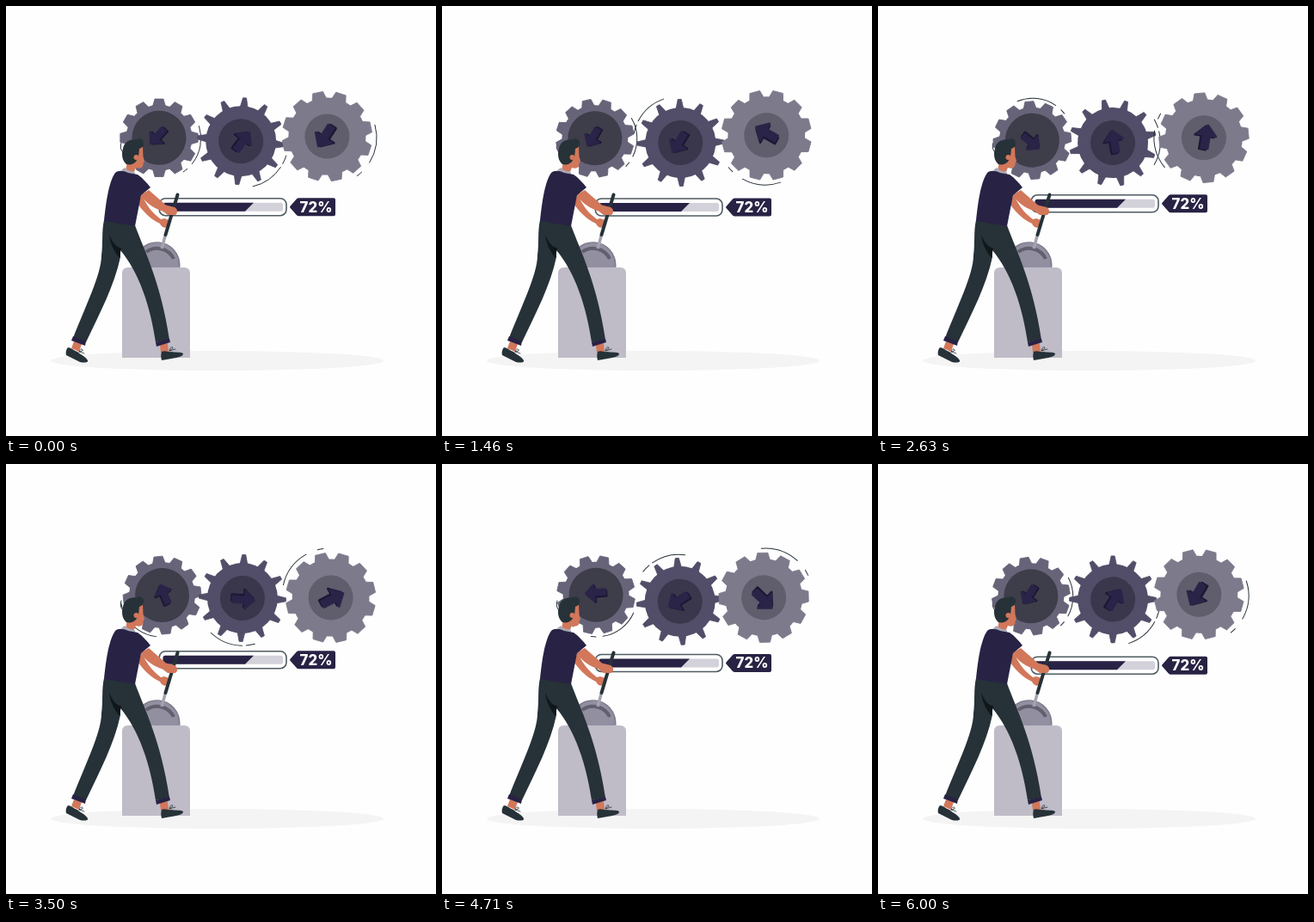
Recreate the animation shown at these times as an HTML page. Size 500 by 500 pixels, loop 6040 ms.

```html
<!DOCTYPE html>
<html lang="en">
<head>
<meta charset="utf-8">
<title>Gears and progress</title>
<style>
  html, body { margin: 0; width: 100%; height: 100%; overflow: hidden; background: #fefefe; }
  svg { display: block; width: 100vw; height: 100vh; }
  .navy { fill: #282244; }
  .dark { fill: #263238; }
  .skin { fill: #d2775a; }
  .line { fill: none; stroke: #263238; stroke-linecap: round; }
</style>
</head>
<body>
<svg viewBox="0 0 500 500">
  <ellipse cx="245.500" cy="412.500" rx="193.500" ry="11.500" fill="#f4f4f4"/>
  <path class="line" d="M134 159C132 165 134 169 139 173"/>

  <g id="gears"></g>

  <g id="bar">
    <rect x="178.300" y="-10" width="147.700" height="20" rx="7" fill="#fefefe" stroke="#4f5c61" stroke-width="1.600"/>
    <rect x="182.500" y="-5" width="139.500" height="10" rx="2.500" fill="#d3d1da"/>
    <path class="navy" d="M185 -5H288L278 5H185Q182.500 5 182.500 2.500V-2.500Q182.500 -5 185 -5Z"/>
    <path class="navy" d="M330.500 1Q329.500 0 330.500 -1L338 -9.500Q339 -10.500 340.500 -10.500H381Q383 -10.500 383 -8.500V8.500Q383 10.500 381 10.500H340.500Q339 10.500 338 9.500Z"/>
    <text x="360.500" y="6" text-anchor="middle" font-family="Inter, sans-serif" font-weight="800" font-size="16.800" fill="#fff">72%</text>
  </g>

  <!-- machine -->
  <circle cx="175.500" cy="302.500" r="27" fill="#918fa0"/>
  <path d="M149.500 299A26 26 0 0 1 201.500 303" fill="none" stroke="#7d7a8c" stroke-width="1.500"/>
  <path d="M163 286A21.500 21.500 0 0 1 195 294" fill="none" stroke="#625f6e" stroke-width="4"/>
  <path d="M185.500 266L181 282" stroke="#a5a3b0" stroke-width="3.500"/>
  <path d="M135 409V311Q135 304 142 304H207Q214 304 214 311V409Z" fill="#bfbcc8"/>

  <!-- rear arm, lever, front arm -->
  <path class="skin" d="M157 220L154 231C161 241 170 249 179 253C181 258 186 259 189 256L190 249L184 247L180 248C171 241 165 234 160 224Z"/>
  <path class="line" d="M199.500 219.500L185.500 266" stroke-width="4"/>
  <path class="skin" d="M156 220L166 214L186 231.500L196 234C200 236 200 241 197 243L188 243L182 238.500C173 236 163 229 156 220Z"/>

  <!-- legs -->
  <g class="skin">
    <path d="M79 390L88 393L85 402L76 398Z"/>
    <path d="M179 394L188 392L189 403L180 403Z"/>
  </g>
  <path class="dark" d="M114 249L150 255C161 285 180 321 190 388L174 391C168 350 155 310 133 284L133 292C126 325 110 355 93 391L78 386C92 350 111 312 111 290C113 276 111 262 114 249Z"/>
  <path d="M120 266C124 276 130 282 134 281L132 293C126 286 121 276 120 266Z" fill="#10171b"/>
  <path class="navy" d="M78 384L93 390L92 395L76 389Z M174 391L190 387L191 391L175 396Z"/>
  <path class="dark" d="M72 397C75 397 78 400 83 402C86 405 92 407 95 412C96 415 90 415 86 414L70 406C69 403 70 399 72 397Z"/>
  <path class="dark" d="M181 402C185 400 189 403 192 402C196 403 204 402 206 404C206 407 202 408 198 409L181 412C180 408 180 405 181 402Z"/>
  <path class="line" stroke-width=".8" d="M85 402C86 398 90 398 89 401L85 402L91 404M190 401C190 397 194 395 194 398L190 401L197 399"/>

  <!-- torso and head -->
  <path class="skin" d="M141 180L139 192L148 195L151 188C157 190 160 187 159.500 183L161 180L159.500 175L159 163L149 165Z"/>
  <path d="M134 191L138 188Q143 193 149 192L151 197L140 197Z" fill="#aaa8b5"/>
  <path class="navy" d="M127 194C130 191 136 191 142 194L153 196C159 200 164 206 168 211L157 220L150 256L114 250C116 232 119 205 127 194Z"/>
  <path class="dark" d="M140 184C135 180 134 172 136 166C137 158 145 154 152 155.500C155 152 161 156 160 160C160 164 157 165 155 166L154 176L151 181C148 184 145 185 140 184Z"/>
  <circle class="skin" cx="151.500" cy="176" r="3"/>
</svg>

<script>
const FPS = 24, FRAMES = 145, LOOP = 6040;

// cx, cy: pivot; dx, dy: offset of the wheel from it; arrow: [x, y, angle, scale];
// arcs: angle ranges of the motion lines; turns: revolutions per loop
const specs = [
  { cx: 180, cy: 154.1, dx: -2, dy: -.8, turns: 4, body: 38.5, tip: 45.2, base: 7.5, top: 5, phase: 0,
    hub: 31.5, outer: '#676379', inner: '#3e3d4a', arrow: [-1.5, -1.5, 133, .82], line: 46.8, arcs: [[-18, 39], [49, 56]] },
  { cx: 275.2, cy: 158.2, dx: -2, dy: -1, turns: 2, body: 41, tip: 50.5, base: 4.5, top: 2, phase: 5,
    hub: 26, outer: '#524d68', inner: '#3a364b', arrow: [1.5, 0, -53, .9], line: 53, arcs: [[33.6, 77], [17.5, 28.5]] },
  { cx: 376, cy: 153, dx: -2.6, dy: -1.4, turns: 1, body: 45, tip: 52, base: 8.5, top: 6, phase: 18,
    hub: 26, outer: '#7d7a8c', inner: '#605d6c', arrow: [-2, 0, 123, .97], line: 55, arcs: [[-15.5, 32], [47, 54]] }
];

const polar = (r, deg) => {
  const a = deg * Math.PI / 180;
  return `${(r * Math.cos(a)).toFixed(2)} ${(r * Math.sin(a)).toFixed(2)}`;
};
const arc = (r, [from, to]) => `M${polar(r, from)}A${r} ${r} 0 0 1 ${polar(r, to)}`;
const arrowPath = 'M14 0L2 -11.500V-4H-14V4H2V11.500Z';

function gear(g) {
  const tooth = `M${g.body - 2} ${-g.base}L${g.tip} ${-g.top}V${g.top}L${g.body - 2} ${g.base}Z`;
  let teeth = '';
  for (let k = 0; k < 12; k++) teeth += `<path d="${tooth}" transform="rotate(${g.phase + 30 * k})"/>`;
  const [x, y, angle, scale] = g.arrow;
  const arrow = (ox, oy, color) =>
    `<path d="${arrowPath}" transform="translate(${ox} ${oy})" fill="${color}" stroke="${color}" stroke-width="2.500" stroke-linejoin="round"/>`;
  return `<g>
    <g transform="translate(${g.dx} ${g.dy})">
      <g fill="${g.outer}" stroke="${g.outer}" stroke-width=".8" stroke-linejoin="round">${teeth}</g>
      <circle r="${g.body}" fill="${g.outer}"/>
      <circle r="${g.hub}" fill="${g.inner}"/>
      <g transform="translate(${x} ${y}) rotate(${angle}) scale(${scale})">
        ${arrow(-1, -1.5, '#1b1733')}${arrow(.5, .8, '#2a2448')}
      </g>
    </g>
    <path class="line" stroke-width="1" d="${g.arcs.map(a => arc(g.line, a)).join('')}"/>
  </g>`;
}

const gears = document.getElementById('gears');
const bar = document.getElementById('bar');
gears.innerHTML = specs.map(gear).join('');

function draw(now) {
  const step = Math.min(FRAMES - 1, Math.floor((now % LOOP + 5) * FPS / 1000));
  specs.forEach((g, i) => {
    const angle = 360 * g.turns * step / FRAMES;
    gears.children[i].setAttribute('transform', `translate(${g.cx} ${g.cy}) rotate(${angle})`);
  });
  // the bar floats up and down at constant speed, four times per loop
  const phase = (step + 1) * 4 / FRAMES % 1;
  const lift = 9.4 * (1 - Math.abs(1 - 2 * phase));
  bar.setAttribute('transform', `translate(0 ${234.2 - lift})`);
}

const start = performance.now();
function tick() {
  draw(performance.now() - start);
  requestAnimationFrame(tick);
}
tick();
</script>
</body>
</html>
```
